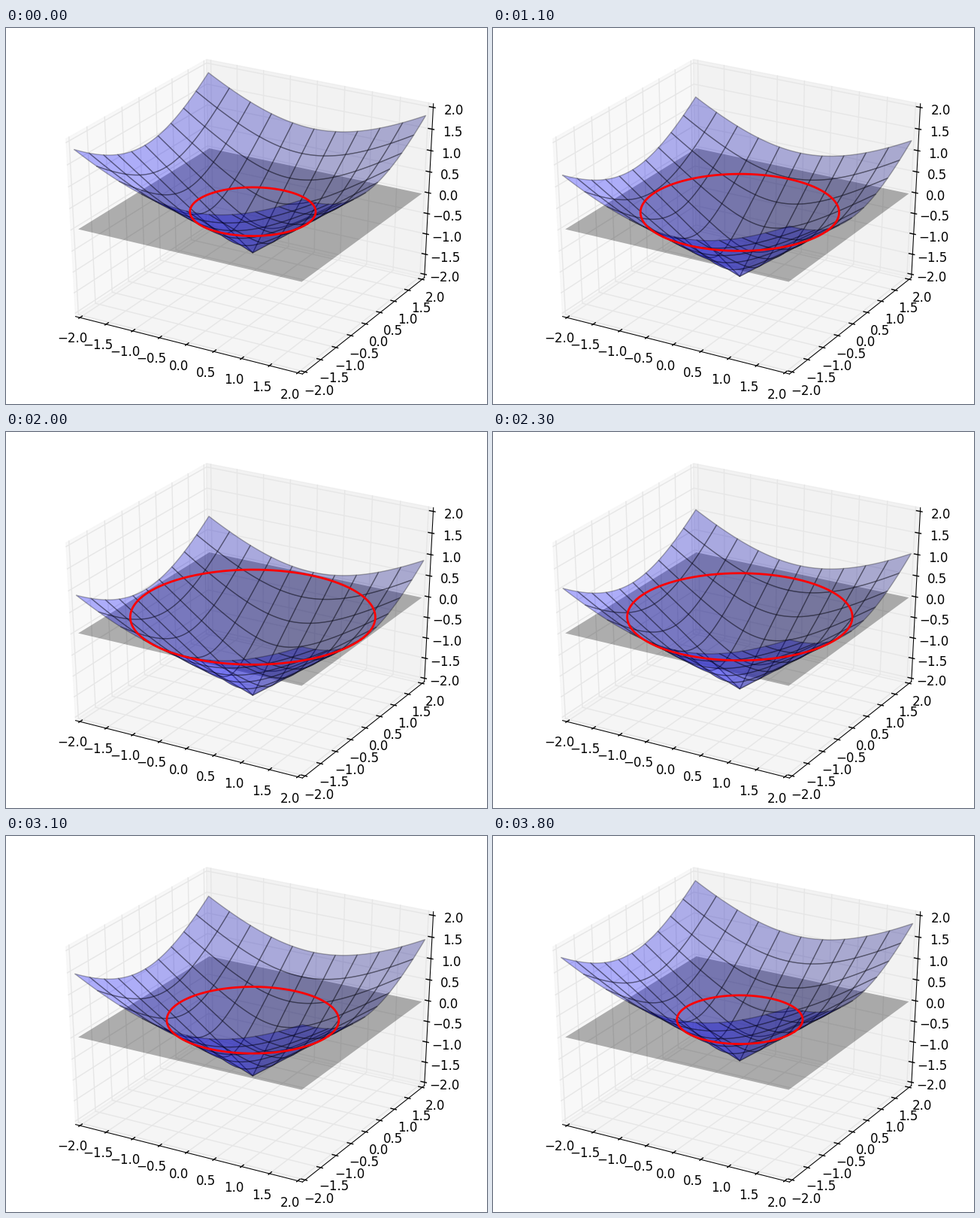
These frames come from a looping animation (640x500 px, 3.9 s). A matplotlib script:

```python
import numpy as np
import matplotlib.pyplot as plt
from matplotlib.animation import FuncAnimation
from matplotlib.collections import PolyCollection

W, H, DPI = 640, 500, 100
LIM = 2.0
STEP = 2 * LIM / 12          # base unit for ticks and label offsets
EDGE = LIM + STEP / 4        # the panes reach a little past the limits
PAD = 0.243                  # distance from axis edge to tick labels
MARGIN = 10.5
RISE = 20                    # steps from the smallest to the largest radius
FRAMES = 2 * RISE - 1
CELLS, SUB = 10, 10

ELEV, AZIM, DIST = np.radians(30), np.radians(-60), 10
NORMAL = np.array([np.cos(AZIM) * np.cos(ELEV),
                   np.sin(AZIM) * np.cos(ELEV), np.sin(ELEV)])
RIGHT = np.array([-np.sin(AZIM), np.cos(AZIM), 0])
UP = np.cross(NORMAL, RIGHT)
SX, SY = (W - 2 * MARGIN) / 0.185, (H - 2 * MARGIN) / 0.185
X0, Y0 = MARGIN + 0.095 * SX, H - MARGIN - 0.095 * SY


def project(points):
    """Return pixel positions and depths of points in data space."""
    p = np.asarray(points, float) / (2 * LIM)
    depth = DIST - p @ NORMAL
    xy = np.stack([X0 + SX * (p @ RIGHT) / depth,
                   Y0 - SY * (p @ UP) / depth], axis=-1)
    return xy, depth


plt.rcParams["font.family"] = "DejaVu Sans"
fig = plt.figure(figsize=(W / DPI, H / DPI), dpi=DPI, facecolor="white")
ax = fig.add_axes([0, 0, 1, 1])
ax.set_xlim(0, W)
ax.set_ylim(H, 0)
ax.axis("off")


def line(points, **style):
    xy, _ = project(points)
    return ax.plot(xy[:, 0], xy[:, 1], **style)[0]


def polygon(points, **style):
    xy, _ = project(points)
    ax.fill(xy[:, 0], xy[:, 1], **style)


def draw_box():
    e = EDGE
    panes = [
        (0.95, [(-e, -e, -e), (-e, e, -e), (-e, e, e), (-e, -e, e)]),
        (0.90, [(-e, e, -e), (e, e, -e), (e, e, e), (-e, e, e)]),
        (0.925, [(-e, -e, -e), (e, -e, -e), (e, e, -e), (-e, e, -e)]),
    ]
    for gray, corners in panes:
        color = (gray, gray, gray, 0.5)
        polygon(corners, facecolor=color, edgecolor=color, lw=1, zorder=0)

    ticks = np.linspace(-LIM, LIM, 9)
    for t in ticks:
        for path in ([(t, -e, -e), (t, e, -e), (t, e, e)],
                     [(e, t, -e), (-e, t, -e), (-e, t, e)],
                     [(-e, -e, t), (-e, e, t), (e, e, t)]):
            line(path, color="0.9", lw=1, zorder=1)

    # start corner, axis direction, tick direction (both as indices)
    axes = [((-e, -e, -e), 0, 1), ((e, -e, -e), 1, 0), ((e, e, -e), 2, 0)]
    for corner, along, across in axes:
        start = np.array(corner)
        end = start.copy()
        end[along] = e
        line([start, end], color="k", lw=0.75, zorder=2)
        for t in ticks:
            base = start.copy()
            base[along] = t
            out = np.sign(start)
            outer, inner = base.copy(), base.copy()
            outer[across] += 0.1 * STEP * out[across]
            inner[across] -= 0.2 * STEP * out[across]
            line([outer, inner], color="k", lw=1, zorder=2)
            out[along] = 0
            (x, y), _ = project(base + PAD * out)
            label = f"{t:.1f}".replace("-", "\u2212")
            ax.text(x, y + 12.5, label, size=12, ha="center", va="baseline",
                    zorder=2)


def cell_outlines():
    """Outlines of the grid cells in the xy plane, with all edge points."""
    size = 2 * LIM / CELLS
    s = np.arange(SUB) / SUB
    one, zero = np.ones(SUB), np.zeros(SUB)
    square = np.column_stack([np.concatenate([s, one, 1 - s, zero]),
                              np.concatenate([zero, s, one, 1 - s])])
    corners = -LIM + size * np.arange(CELLS)
    gx, gy = np.meshgrid(corners, corners)
    origin = np.column_stack([gx.ravel(), gy.ravel()])
    return origin[:, None] + size * square, origin + size / 2


draw_box()
l = LIM
polygon([(-l, -l, 0), (l, -l, 0), (l, l, 0), (-l, l, 0)],
        facecolor=(0, 0, 0, 0.3), edgecolor="none", lw=0, zorder=3)

outlines, centers = cell_outlines()
heights = np.hypot(outlines[..., 0], outlines[..., 1])
angle = np.arctan2(centers[:, 1], centers[:, 0])
shade = 0.75 - 0.25 * np.cos(angle - np.pi / 4)
colors = np.zeros((len(shade), 4))
colors[:, 2] = shade
colors[:, 3] = 0.3

cone = PolyCollection([], edgecolors=[(0, 0, 0, 0.3)], linewidths=1, zorder=4)
ax.add_collection(cone, autolim=False)
theta = np.linspace(0, 2 * np.pi, 201)
ring = np.column_stack([np.cos(theta), np.sin(theta), 0 * theta])
circle = line(ring, color="red", lw=2, zorder=5)


def update(i):
    step = RISE - 1 - abs(RISE - 1 - i)
    radius = 1 + step / (RISE - 1)
    xy, depth = project(np.dstack([outlines, heights - radius]))
    order = np.argsort(-depth.mean(axis=1))      # far cells first
    cone.set_verts(xy[order])
    cone.set_facecolor(colors[order])
    rim, _ = project(radius * ring)
    circle.set_data(rim[:, 0], rim[:, 1])
    return cone, circle


anim = FuncAnimation(fig, update, frames=FRAMES, interval=100, repeat=True,
                     repeat_delay=0, blit=False)
plt.show()
```
